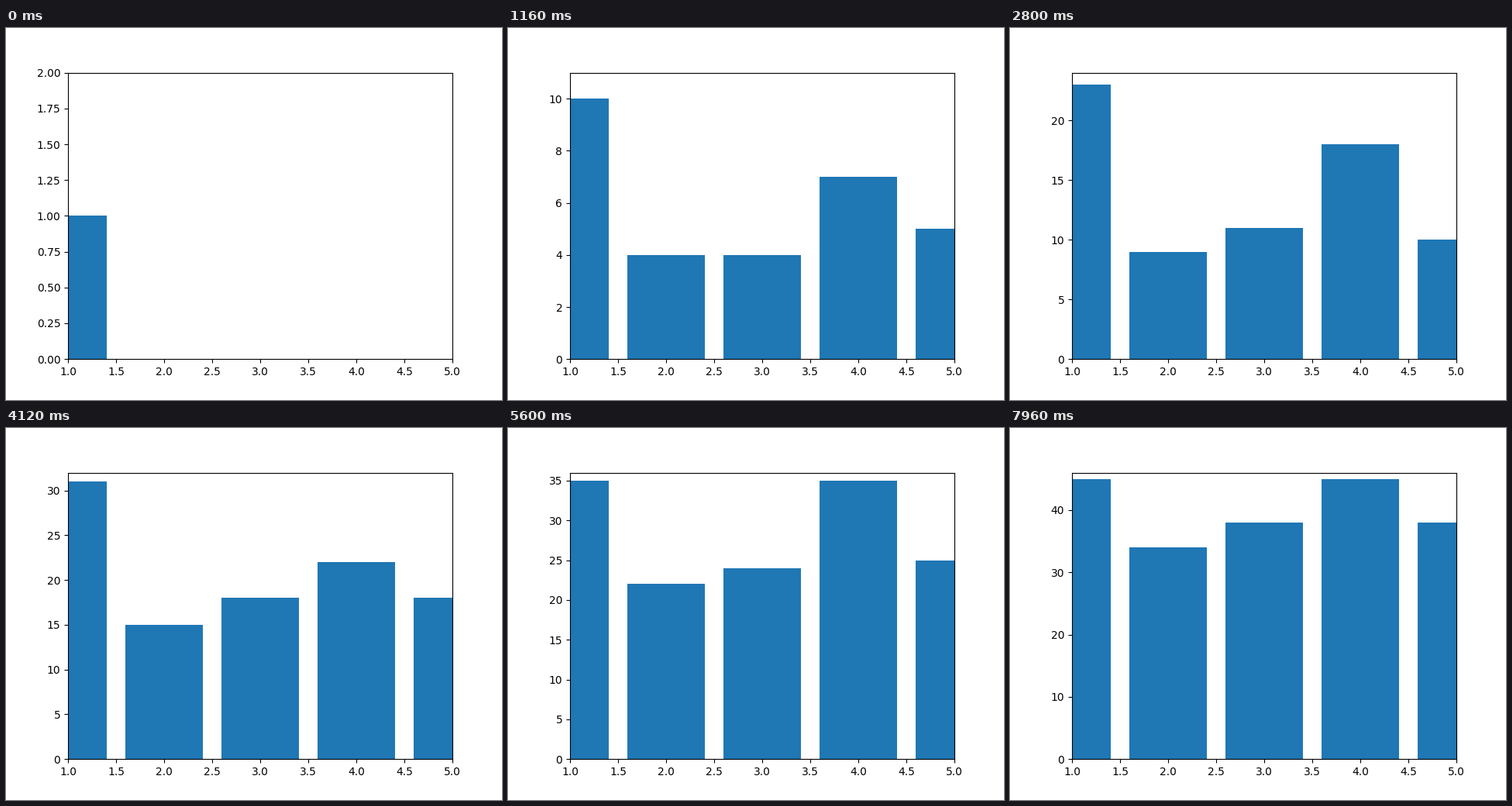
Write a matplotlib script that moves like this. It is 640 px wide and 480 px high and loops after 8 s.

```python
import matplotlib.pyplot as plt
from matplotlib.animation import FuncAnimation

INTERVAL = 40
FACES = range(1, 6)

# A few key tallies of the five outcomes; every frame adds one roll.
KEYS = [
    (1, 0, 0, 0, 0),
    (10, 4, 4, 7, 5),
    (23, 9, 11, 18, 10),
    (31, 15, 18, 22, 18),
    (35, 22, 24, 35, 25),
    (40, 28, 32, 39, 31),
    (45, 34, 38, 45, 38),
]


def rolls_between(start, end):
    """Outcomes that raise every bar at a steady pace from start to end."""
    slots = []
    for face, (a, b) in enumerate(zip(start, end)):
        gain = b - a
        slots += [((k + 0.5) / gain, face) for k in range(gain)]
    return [face for _, face in sorted(slots)]


def build_history():
    history = [KEYS[0]]
    for start, end in zip(KEYS, KEYS[1:]):
        for face in rolls_between(start, end):
            counts = list(history[-1])
            counts[face] += 1
            history.append(counts)
    return history


history = build_history()

fig, ax = plt.subplots(figsize=(6.4, 4.8), dpi=100)
bars = ax.bar(FACES, history[0], color="#1f77b4")
ax.set_xlim(1, 5)


def update(frame):
    counts = history[frame]
    for bar, count in zip(bars, counts):
        bar.set_height(count)
    ax.set_ylim(0, max(counts) + 1)
    return bars


anim = FuncAnimation(fig, update, frames=len(history), interval=INTERVAL,
                     init_func=lambda: update(0), repeat=True,
                     repeat_delay=0, blit=False)
plt.show()
```
